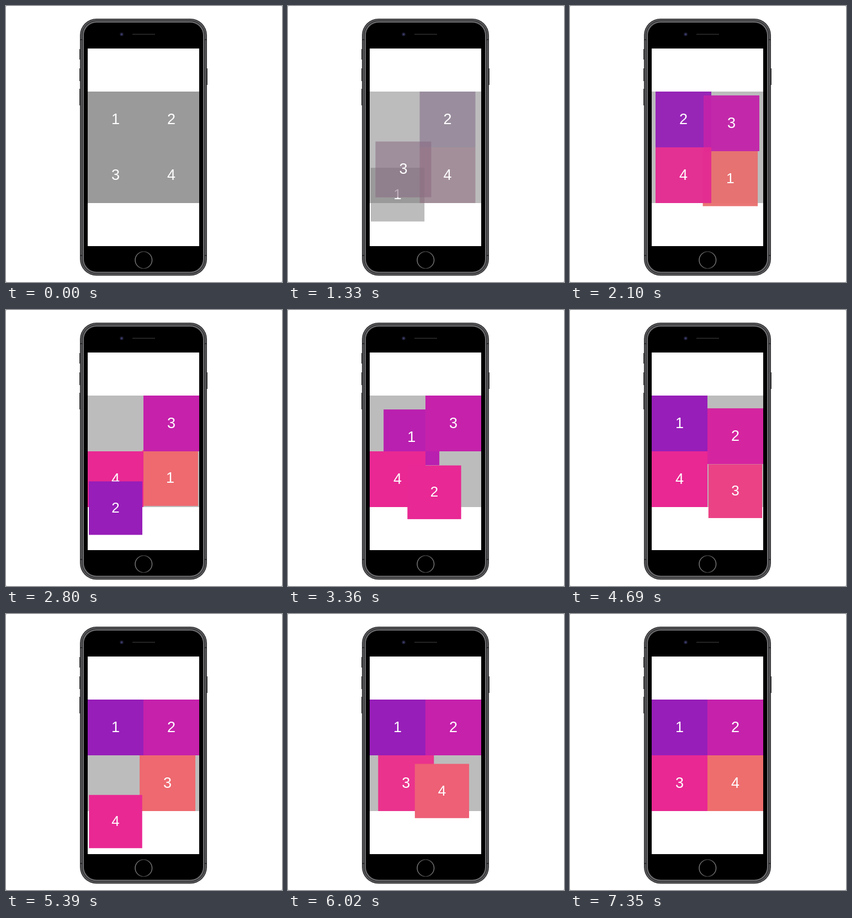
Recreate the animation shown at these times as an HTML page with a canvas. Size 500x500 px, loop 7560 ms.

```html
<!DOCTYPE html>
<html lang="en">
<head>
<meta charset="utf-8">
<title>Reordering tiles</title>
<style>
  html, body { margin: 0; width: 100%; height: 100%; overflow: hidden; background: #fff; }
  canvas { display: block; width: 100vw; height: 100vh; }
</style>
</head>
<body>
<canvas id="stage" width="500" height="500"></canvas>
<script>
const ctx = document.getElementById('stage').getContext('2d');
const LOOP = 7560, SETTLE = 1344, HOLD = 150, FALL = 250;
const LEFT = 148, TOP = 155, SIZE = 101, DROP_Y = 376;
const GRAY = [122, 122, 122];
const RAMP = [[151, 30, 185], [197, 33, 171], [233, 40, 147], [238, 110, 109]];

// Each move drops one tile below the grid and sends it to the last slot.
const MOVES = [
  { tile: 1, lift: 1153, start: 1189, order: [2, 3, 4, 1] },
  { tile: 2, lift: 2600, start: 2753, order: [1, 3, 4, 2] },
  { tile: 3, lift: 4059, start: 4059, order: [1, 2, 4, 3] },
  { tile: 4, lift: 5140, start: 5281, order: [1, 2, 3, 4] },
];

const clamp = v => Math.min(1, Math.max(0, v));
const mix = (a, b, t) => a + (b - a) * t;
const mixAll = (a, b, t) => a.map((v, i) => mix(v, b[i], t));
const smooth = v => { const u = clamp(v); return u * u * (3 - 2 * u); };

// cubic-bezier(.25, .1, .25, 1)
function ease(v) {
  const x = clamp(v);
  if (x === 0 || x === 1) return x;
  let lo = 0, hi = 1, s = .5;
  for (let i = 0; i < 24; i++) {
    s = (lo + hi) / 2;
    if (.75 * s * (1 - s) + s ** 3 < x) lo = s; else hi = s;
  }
  return .3 * s * (1 - s) ** 2 + 3 * s * s * (1 - s) + s ** 3;
}

const slotCenter = slot => [
  LEFT + SIZE * (slot % 2 + .5),
  TOP + SIZE * (Math.floor(slot / 2) + .5),
];

function ramp(shade) {
  const i = Math.min(2, Math.floor(shade));
  return mixAll(RAMP[i], RAMP[i + 1], shade - i);
}

// Blends half-transparent gray into an opaque colour, weighted by alpha.
function tileColor(shade, reveal) {
  const alpha = mix(.5, 1, reveal);
  const rgb = mixAll(GRAY, ramp(shade), reveal / alpha).map(Math.round);
  return `rgba(${rgb}, ${alpha})`;
}

function tileState(tile, time) {
  let center = slotCenter(tile - 1);
  let shade = MOVES[0].order.indexOf(tile);
  let scale = 1, reveal = 0;
  MOVES.forEach((move, n) => {
    const slot = move.order.indexOf(tile);
    let progress = ease((time - move.start) / SETTLE);
    if (tile === move.tile) {
      const fall = smooth((time - move.lift) / FALL);
      progress = ease((time - move.start - HOLD) / (SETTLE - HOLD));
      center = mixAll(center, [center[0], DROP_Y], fall);
      scale -= .045 * fall * (1 - progress ** 4);
    }
    center = mixAll(center, slotCenter(slot), progress);
    shade = mix(shade, slot, progress);
    if (n === 0) reveal = progress;
  });
  return { center, shade, scale, reveal };
}

function drawTile(tile, time) {
  const { center, shade, scale, reveal } = tileState(tile, time);
  ctx.save();
  ctx.translate(...center);
  ctx.scale(scale, scale);
  ctx.fillStyle = tileColor(shade, reveal);
  ctx.fillRect(-SIZE / 2, -SIZE / 2, SIZE, SIZE);
  ctx.fillStyle = '#fff';
  ctx.font = '27px "Liberation Sans", Arial, sans-serif';
  ctx.textAlign = 'center';
  ctx.fillText(tile, 0, 8.2);
  ctx.restore();
}

function rect(color, x, y, w, h) {
  ctx.fillStyle = color;
  ctx.fillRect(x, y, w, h);
}

function rounded(color, inset) {
  ctx.fillStyle = color;
  ctx.beginPath();
  ctx.roundRect(134 + inset, 23 + inset, 230 - 2 * inset, 465.5 - 2 * inset, 30 - inset);
  ctx.fill();
}

function circle(x, y, r) {
  ctx.beginPath();
  ctx.arc(x, y, r, 0, Math.PI * 2);
}

function drawPhone() {
  for (const [y, h] of [[78, 19], [113, 23], [150, 30]]) rect('#333', 133, y, 2, h);
  rect('#333', 363, 113, 2, 30);
  rounded('#1c1c1e', 0);
  rounded('#5c5c5f', 1);
  rounded('#38383a', 3);
  rounded('#707073', 5);
  rounded('#000', 7);
  for (const y of [60, 451]) {
    rect('#2b2b2d', 135, y, 4, 2);
    rect('#2b2b2d', 359, y, 4, 2);
  }
  ctx.fillStyle = '#1d1d33';
  circle(209.5, 51.3, 3.3);
  ctx.fill();
  ctx.fillStyle = '#44447c';
  circle(209.5, 51.3, 1.4);
  ctx.fill();
  rect('#2c2c2c', 229, 50.5, 41, 1.6);

  const ring = ctx.createLinearGradient(234, 460, 265, 460);
  ring.addColorStop(0, '#808080');
  ring.addColorStop(.5, '#303030');
  ring.addColorStop(1, '#808080');
  ctx.strokeStyle = ring;
  ctx.lineWidth = 1.4;
  circle(249.3, 460.3, 15.3);
  ctx.stroke();
}

function draw(time) {
  rect('#fff', 0, 0, 500, 500);
  for (const x of [0, 499]) for (const y of [0, 499]) rect('#bbb', x, y, 1, 1);
  drawPhone();
  rect('#fff', 148, 77, 202, 358);
  ctx.save();
  ctx.beginPath();
  ctx.rect(148, 77, 202, 358);
  ctx.clip();
  rect(`rgba(${GRAY}, .5)`, LEFT, TOP, SIZE * 2, SIZE * 2);

  // After the first move, the travelling tile passes over the others.
  const front = MOVES.slice(1).filter(move => move.lift <= time).pop();
  const top = front ? front.tile : 4;
  for (const tile of [1, 2, 3, 4].filter(t => t !== top).concat(top)) drawTile(tile, time);
  ctx.restore();
}

const origin = performance.now();
function tick() {
  draw((performance.now() - origin) % LOOP);
  requestAnimationFrame(tick);
}
tick();
</script>
</body>
</html>
```
